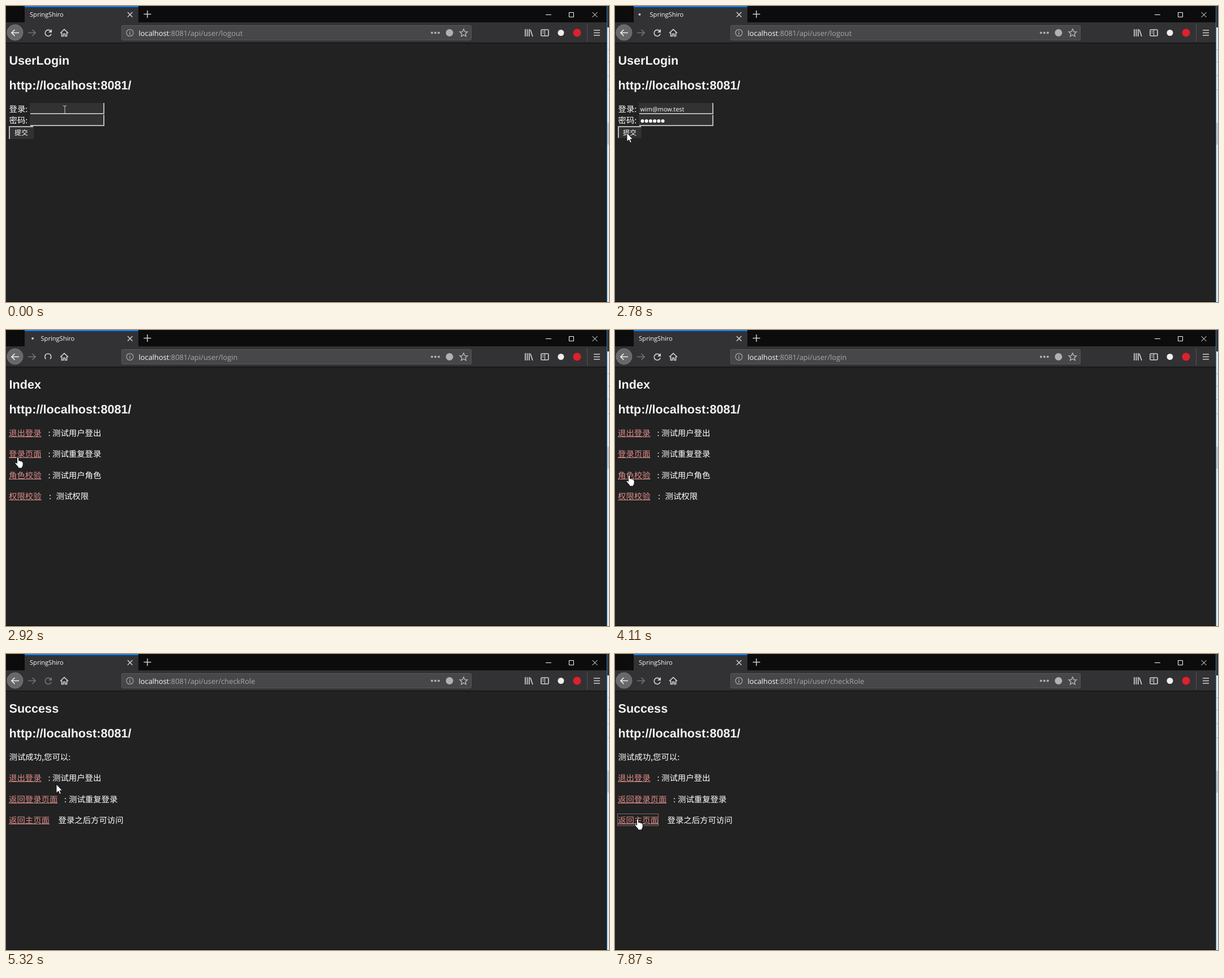
An HTML page for the animation above (8000 ms loop, 1066x525 px).

```html
<!DOCTYPE html>
<html lang="zh">
<head>
<meta charset="utf-8">
<title>SpringShiro</title>
<style>
html, body { margin: 0; width: 100%; height: 100%; overflow: hidden; background: #222; }
svg { display: block; width: 1066px; height: 525px; }
text { white-space: pre; text-rendering: geometricPrecision; }
.ui { font-family: "Open Sans", "Noto Sans", sans-serif; }
.cn { font: 14.4px "Noto Sans CJK SC", "Noto Sans CJK", sans-serif; }
.head { font: bold 21.6px "Liberation Sans", Arial, sans-serif; }
.line { fill: none; stroke: #cfcfd0; stroke-width: 1.7; }
</style>
</head>
<body>
<svg viewBox="0 0 1066 525">
  <rect width="1066" height="66" fill="#0c0c0d"/>
  <rect x="33" width="201" height="30" fill="#323234"/>
  <rect x="33" width="201" height="2" fill="#0a84ff"/>
  <rect y="29" width="1062" height="36" fill="#323234"/>
  <g class="line">
    <path d="M215 11l8.5 8.5m0-8.5l-8.5 8.5M243.500 14.500h13m-6.500-6.500v13" stroke-width="1.500"/>
    <path d="M954 15.500h10M995.500 11.500h8v8h-8zM1036.500 11l9 9m0-9l-9 9" stroke="#fff" stroke-width="1"/>
    <circle cx="16" cy="47" r="14" fill="#68686a" stroke="#77777a" stroke-width="1"/>
    <path d="M23 47.500h-13m5.500-5.500l-5.500 5.500 5.500 5.500" stroke="#eee"/>
    <path d="M39 47.500h13m-5.500-5.500l5.500 5.500-5.500 5.500" stroke="#747476"/>
    <path d="M96 48l7-6.500 7 6.500M98.500 47v6.500h3v-4h3v4h3V47"/>
    <rect x="204.500" y="34.500" width="618" height="26" rx="2" fill="#474749" stroke="#59595b" stroke-width="1"/>
    <circle cx="219" cy="47.500" r="6" stroke="#b1b1b3" stroke-width="1.100"/>
    <path d="M219 46.500v4.500M219 44v1.300" stroke="#b1b1b3" stroke-width="1.300"/>
    <path d="M809 41l2 4.400 4.700.5-3.500 3.200 1 4.700-4.200-2.400-4.200 2.400 1-4.700-3.500-3.200 4.700-.5z" stroke="#b1b1b3" stroke-width="1.500"/>
    <path d="M918 41v13M921.500 41v13M925 41v13M927 42l4 12"/>
    <rect x="946" y="42" width="13" height="11" rx="1.500"/>
    <path d="M952.500 42v11M948 45h3M948 48h3" stroke-width="1.200"/>
    <path d="M1027.500 32v31" stroke="#545456" stroke-width="1"/>
    <path d="M1039 43h11m-11 4.500h11m-11 4.500h11"/>
  </g>
  <g fill="#b1b1b3">
    <circle cx="753" cy="47.500" r="2"/><circle cx="759" cy="47.500" r="2"/><circle cx="765" cy="47.500" r="2"/>
    <circle cx="784" cy="47.500" r="6.500"/>
  </g>
  <circle cx="981" cy="47.500" r="5.500" fill="#eee"/>
  <circle cx="1009.500" cy="47.500" r="7" fill="#e0202c"/>
  <rect x="1062" width="4" height="525" fill="#dfe9f3"/>
  <rect x="1062" width="4" height="38" fill="#2b2f36"/>
  <path d="M1063 77.500h3m-3 22h3m-3 24h3m-3 25h3" stroke="#b4bcc6"/>
  <rect x="1063" y="207" width="3" height="39" fill="#bfc8d2"/>
  <path d="M1062.500 0v525" stroke="#3b84bd"/>
  <g id="view"></g>
</svg>
<script>
const LOOP = 8000;
const USERS = ["finn@mow.test", "nelly@mow.test", "wim@mow.test"];

// link, colon x, text x, text
const PAGES = {
  login: { title: "UserLogin", path: "logout", rows: [] },
  index: { title: "Index", path: "login", rows: [
    ["退出登录", 74.5, 82, "测试用户登出"],
    ["登录页面", 74.5, 82, "测试重复登录"],
    ["角色校验", 74.5, 82, "测试用户角色"],
    ["权限校验", 76, 88.5, "测试权限"]] },
  success: { title: "Success", path: "checkRole", note: "测试成功,您可以:", rows: [
    ["退出登录", 74.5, 82, "测试用户登出"],
    ["返回登录页面", 103, 111, "测试重复登录"],
    ["返回主页面", 0, 92.5, "登录之后方可访问"]] }
};

// start, end, steps, x, y
const MOVES = [
  [540, 1140, 9, 89, 235], [1730, 1730, 1, 89, 237], [1890, 2390, 8, 21, 225],
  [3220, 3580, 6, 45, 278], [3830, 3890, 2, 29, 267], [4050, 4110, 2, 25, 257],
  [5100, 5320, 4, 89, 231], [5530, 5830, 5, 42, 140], [5910, 5990, 2, 53, 108],
  [6280, 6360, 2, 44, 108], [6500, 7010, 8, 39, 291], [7160, 7160, 1, 40, 292]
];

const CURSORS = {
  arrow: '<path d="M0 0V15.500L3.600 12.200 6 17.500 8.300 16.500 6 11.300H10.500Z" fill="#fff" stroke="#000" stroke-width=".8"/>',
  hand: '<path d="M-1.500 1.500Q0-.5 1.500 1.500V7Q3.500 6 4.600 7.600 6.500 7 7.200 8.600 9.200 8.500 9.200 11V14Q9.200 17 7.500 18V20H.5V18Q-2.500 15-4.900 11.500-4.500 8.500-1.500 11.500Z" fill="#fff" stroke="#000" stroke-width=".9"/>',
  beam: '<path d="M-3-7H-1L0-6 1-7H3M0-6V6M-3 7H-1L0 6 1 7H3" fill="none" stroke="#ccc"/>'
};

const view = document.getElementById("view");
const within = (t, a, b) => t >= a && t < b;
const rect = (x, y, w, h, fill) => `<rect x="${x}" y="${y}" width="${w}" height="${h}" fill="${fill}"/>`;
const label = (x, y, s, fill, cls, size) =>
  `<text x="${x}" y="${y}" fill="${fill}" class="${cls}"${size ? ` font-size="${size}"` : ""}>${s}</text>`;

function pointer(t) {
  let x = 104, y = 184;
  for (const [start, end, steps, toX, toY] of MOVES) {
    if (t < start) break;
    const done = steps > 1 ? Math.floor((t - start) / (end - start) * (steps - 1) + 1e-6) : 0;
    const k = Math.min(1, (done + 1) / steps);
    x += (toX - x) * k;
    y += (toY - y) * k;
  }
  return [x, y];
}

const rowY = (page, i) => 182 + 37.5 * (i + (page.note ? 1 : 0));

function cursorKind(page, x, y) {
  if (page === PAGES.login) return y < 191 ? "beam" : "arrow";
  if (within(y, 84, 109) && x < 92 || within(y, 128, 152) && x < 220) return "beam";
  for (const [i, [link, , textX, text]] of page.rows.entries()) {
    if (Math.abs(y - rowY(page, i)) > 9.5) continue;
    if (x < 5 + link.length * 14.4) return "hand";
    if (within(x, textX, textX + text.length * 14.4)) return "beam";
  }
  return "arrow";
}

function chrome(t, page) {
  const loading = within(t, 2700, 3080) || within(t, 4740, 5240);
  const spinning = within(t, 2860, 3080) || within(t, 4900, 5240);
  const dim = within(t, 3080, 3400) || within(t, 5240, 5600);
  let s = label(loading ? 61.5 : 42, 19, "SpringShiro", "#f9f9fa", "ui", 11.1);
  if (loading) {
    const tick = Math.floor((t - 2620) / 80) * 80 - 120;
    s += `<circle cx="${49 - 6 * Math.cos(tick / 600 * 2 * Math.PI)}" cy="15" r="2" fill="#c8c8ca"/>`;
  }
  s += `<g class="line"${dim ? ' opacity=".4"' : ""}>` + (spinning
    ? '<path d="M70.500 51.500a5.500 5.500 0 1 1 7.500 0"/>'
    : '<path d="M79 44.500a5.500 5.500 0 1 0 1 5"/><path d="M81 41v6h-6z" fill="#cfcfd0" stroke="none"/>') + "</g>";
  return s + label(234.5, 52.5,
    `<tspan fill="#f9f9fa">localhost</tspan>:8081/api/user/${page.path}`, "#a9a9ab", "ui", 12.87);
}

function field(y) {
  return rect(42, y, 132, 20, "#323232") +
    `<path d="M43 ${y + 19}H173V${y}" fill="none" stroke="#b8b8b8" stroke-width="2"/>`;
}

function dropdown(chosen) {
  let s = rect(41, 191, 132, 56, "#8a9099") + rect(42, 192, 130, 54, "#fff");
  USERS.forEach((user, i) => {
    const y = 192 + 18 * i, on = chosen && i === 2, ink = on ? "#fff" : "#666";
    if (on) s += rect(42, y, 130, 18, "#0078d7");
    s += `<path d="M56 ${y + 8}l-7 7" stroke="${ink}" stroke-width="3"/>` +
      `<circle cx="56.500" cy="${y + 7.5}" r="4" fill="${ink}"/>` +
      `<circle cx="58" cy="${y + 6}" r="1" fill="${on ? "#0078d7" : "#fff"}"/>` +
      label(64, y + 14, user, on ? "#fff" : "#000", "ui", 11.2);
  });
  return s;
}

function form(t) {
  const pressed = t >= 2620, filled = t >= 1510;
  let s = label(5.5, 187.5, "登录:", "#fff", "cn") + label(5.5, 208, "密码:", "#fff", "cn") +
    field(172) + field(193);
  const w = pressed ? 42 : 44, h = pressed ? 21 : 23;
  s += rect(5, 213, w, h, "#323232") +
    `<path d="M6 ${213 + h}V214H${4 + w}" fill="none" stroke="#b8b8b8" stroke-width="2"/>` +
    `<text x="${pressed ? 14 : 15}" y="${pressed ? 228.5 : 229}" fill="#fff" class="cn" style="font-size:12px">提交</text>`;
  if (filled) {
    s += label(44.5, 187, USERS[2], "#fff", "ui", 10.95);
    for (let i = 0; i < 6; i++) s += `<circle cx="${48.5 + 7.2 * i}" cy="204" r="3" fill="#fff"/>`;
  }
  if (within(t, 80, 580) || within(t, 1080, 1510)) s += rect(45, 174, 1, 16, "#fff");
  if (within(t, 1510, 2010)) s += rect(124, 174, 1, 16, "#fff");
  if (within(t, 80, 1510)) s += dropdown(t >= 1430);
  return s;
}

function links(page, ink, linkInk, focus) {
  let s = page.note ? label(5.5, 187.5, page.note, ink, "cn") : "";
  page.rows.forEach(([link, colonX, textX, text], i) => {
    const y = rowY(page, i), w = link.length * 14.4;
    s += label(5, y + 5.5, link, linkInk, "cn") + rect(5, Math.round(y + 6.5), w, 1, linkInk) +
      (colonX ? label(colonX, y + 5.5, ":", ink, "cn") : "") + label(textX, y + 5.5, text, ink, "cn");
    if (i === focus)
      s += `<rect x="4.500" y="${Math.floor(y - 11) + .5}" width="${Math.round(w)}" height="21" fill="none" stroke="#e0b0b0" stroke-dasharray="1 1"/>`;
  });
  return s;
}

function scene(t) {
  const page = t < 2860 ? PAGES.login : t < 4900 ? PAGES.index : PAGES.success;
  const bright = within(t, 2860, 2920);
  const ink = bright ? "#000" : "#fff";
  const focus = within(t, 4660, 4900) || t >= 7870 ? 2 : -1;
  const [x, y] = pointer(t);
  return chrome(t, page) +
    rect(0, 66, 1062, 459, bright ? "#fff" : "#222") +
    (bright ? "" : rect(0, 524, 1062, 1, "#0c0c0d")) +
    label(5.5, 104, page.title, bright ? ink : "#f4f4f4", "head") +
    label(5.5, 148, "http://localhost:8081/", bright ? ink : "#f4f4f4", "head") +
    (page === PAGES.login ? form(t) : links(page, ink, bright ? "#0000ee" : "#dc8b8b", focus)) +
    `<g transform="translate(${x} ${y})">${CURSORS[cursorKind(page, x, y)]}</g>`;
}

let shown = "";
function frame() {
  const next = scene(performance.now() % LOOP);
  if (next !== shown) view.innerHTML = shown = next;
  requestAnimationFrame(frame);
}
frame();
</script>
</body>
</html>
```
